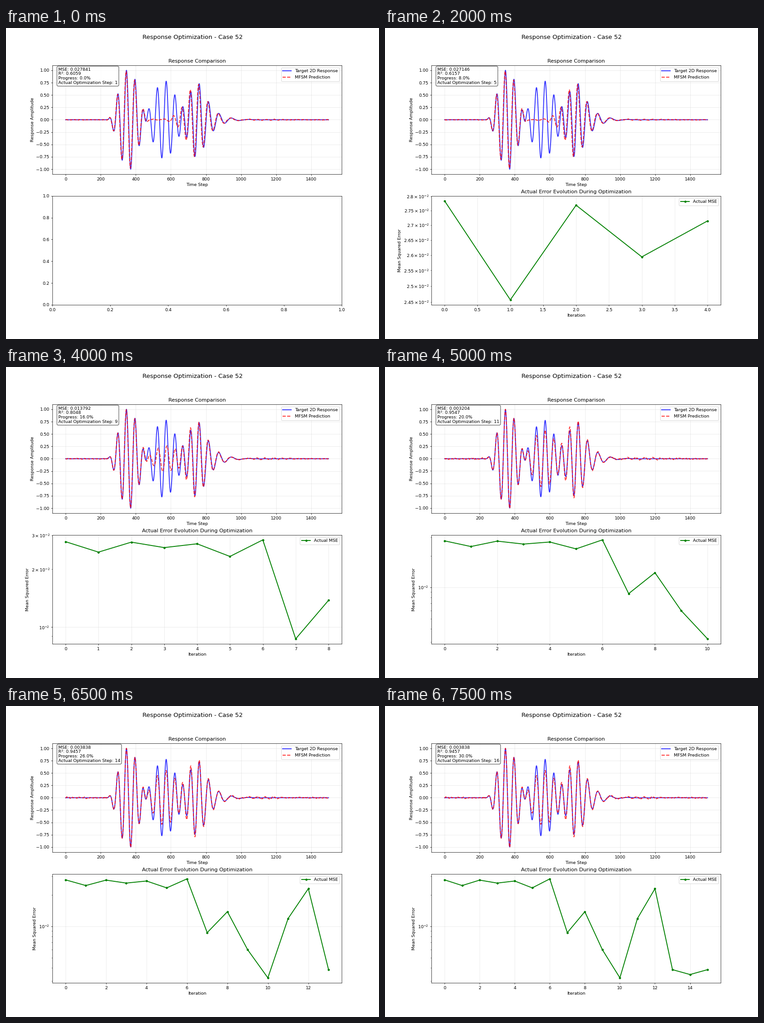
A matplotlib script for the animation above (8000 ms loop, 820 px wide and 683 px high).

```python
import numpy as np
import matplotlib.pyplot as plt
from matplotlib.animation import FuncAnimation

FRAMES, INTERVAL = 16, 500
VARIANCE = 0.070645

# Mean squared error measured at each step
MSE = [0.027841, 0.02457, 0.02769, 0.02594, 0.027146, 0.02333, 0.028449, 0.00869,
       0.013792, 0.00596, 0.0032036, 0.01187, 0.02292, 0.003838, 0.003447, 0.003838]

t = np.arange(1500)


def burst(center, period, half):
    """Sine tone inside a Hann window."""
    x = t - center
    window = np.cos(np.pi / 2 * np.clip(x / half, -1, 1)) ** 2
    return window * np.sin(2 * np.pi * x / period)


def dispersed(peak, rise, fall=55):
    """Late packet whose oscillation slows down as it fades."""
    x = t - peak
    env = 1 / (np.exp(-(x + 23) / rise) + np.exp((x + 23) / fall))
    half_period = 25.3 + 0.019 * x + 0.00006 * x ** 2
    return env * np.cos(np.pi * x / half_period)


def response(first=1.0, middle=1.0, last=1.5, lag=0.0, delay=0.0, rise=37):
    return (-1.025 * first * burst(359 - lag / 2, 49.4, 124)
            + 0.78 * middle * burst(561 + delay, 50.5, 138)
            + last * dispersed(762 - lag, rise))


def predict(mse):
    gain = 1 - (mse / 0.0265) ** 0.6
    fit = np.clip(gain / 0.65, 0, 1)
    curve = response(first=0.98 + 0.025 * fit, middle=gain, last=1.5 + 0.1 * fit,
                     lag=3 * (1 - fit), delay=20 * fit * (1 - fit), rise=42)

    rng = np.random.default_rng(int(mse * 1e6))
    noise = np.convolve(rng.normal(0, 0.007 + 0.006 * fit, len(t)), np.ones(5) / 5, "same")
    ripple = (0.008 + 0.012 * fit) * np.sin(2 * np.pi * t / 47)
    ripple *= np.exp(-((t - 1130) / 130) ** 2)
    return curve + (noise + ripple) * (np.abs(curve) < 0.3)


TARGET = response()

fig, (top, low) = plt.subplots(2, 1, figsize=(12.006, 10), dpi=68.3)
fig.subplots_adjust(left=0.1245)
fig.suptitle("Response Optimization - Case 52", fontsize=14)


def draw_response(step):
    mse = MSE[step]
    top.clear()
    top.plot(t, TARGET, "b-", lw=2, alpha=0.8, label="Target 2D Response")
    top.plot(t, predict(mse), "r--", lw=2, alpha=0.8, label="MFSM Prediction")
    top.set(title="Response Comparison", xlabel="Time Step", ylabel="Response Amplitude")
    top.grid(True, alpha=0.3)
    top.legend(loc="upper right")
    info = (f"MSE: {mse:.6f}\nR²: {1 - mse / VARIANCE:.4f}\n"
            f"Progress: {2 * step:.1f}%\nActual Optimization Step: {step + 1}")
    top.text(0.02, 0.98, info, transform=top.transAxes, va="top", linespacing=1.1,
             bbox=dict(boxstyle="round", facecolor="white", alpha=0.8))


def draw_error(step):
    low.clear()
    if step == 0:
        return
    low.semilogy(range(step + 1), MSE[:step + 1], "g-o", lw=2, ms=4, label="Actual MSE")
    low.set(title="Actual Error Evolution During Optimization",
            xlabel="Iteration", ylabel="Mean Squared Error")
    low.grid(True, alpha=0.3)
    low.legend()


def update(step):
    draw_response(step)
    draw_error(step)
    return []


anim = FuncAnimation(fig, update, frames=FRAMES, interval=INTERVAL, repeat=True, repeat_delay=0)
plt.show()
```
